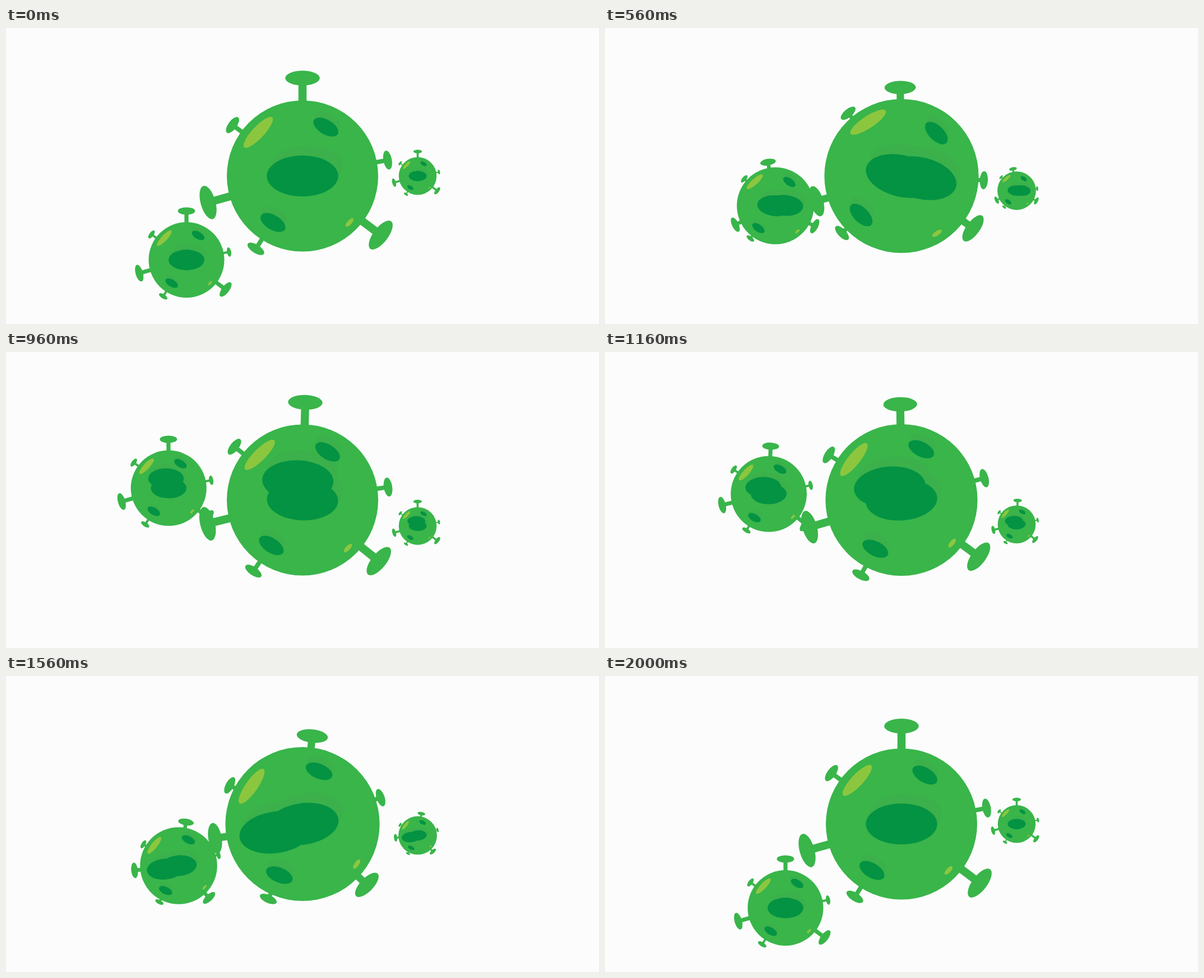
An HTML page with a canvas that plays this animation: 1058x529 px, repeating every 2040 ms.

```html
<!DOCTYPE html>
<html lang="en">
<head>
<meta charset="utf-8">
<title>Floating viruses</title>
<style>
  html, body { margin: 0; width: 100%; height: 100%; overflow: hidden; background: #fcfcfc; }
  canvas { display: block; }
</style>
</head>
<body>
<canvas id="stage" width="1058" height="529"></canvas>
<script>
const ctx = document.getElementById('stage').getContext('2d');
const GREEN = '#39b54a', DARK = '#049343', SHADE = '#3bb04b', LIGHT = '#8cc63f';
const LOOP = 2040, STEP = 40;
const rad = degrees => degrees * Math.PI / 180;

// Cubic bezier easing with flat ends
function ease(x) {
  let low = 0, high = 1, s = 0.5;
  for (let i = 0; i < 24; i++) {
    s = (low + high) / 2;
    const at = 3 * s * (1 - s) ** 2 * 0.33 + 3 * s * s * (1 - s) * 0.716 + s ** 3;
    if (at < x) low = s; else high = s;
  }
  return s * s * (3 - 2 * s);
}

// Eased value of a list of [time, value] keys
function track(t, keys) {
  const next = keys.findIndex(key => key[0] >= t);
  if (next === 0) return keys[0][1];
  const [t0, a] = keys[next - 1], [t1, b] = keys[next];
  return a + (b - a) * ease((t - t0) / (t1 - t0));
}
const quarters = (t, ...values) => track(t, values.map((v, i) => [i * 500, v]));

// Radial spikes: angle clockwise from the top, in degrees
const BIG = { angles: [0, 127.1, 254.3], reach: 175, a: 30.8, b: 13.2, stalk: 14.5 };
const SMALL = { angles: [-53.9, 79.4, 212.6], reach: 154.5, a: 17, b: 7.6, stalk: 8 };
const DARK_SPOTS = [[41.7, -87.5], [-52.7, 83]];
const LIGHT_SPOTS = [[-79, -78, 36.8, 10.6], [84, 83, 9.6, 4]];

function ellipse(x, y, a, b, angle, color) {
  ctx.fillStyle = color;
  ctx.beginPath();
  ctx.ellipse(x, y, a, b, angle, 0, 2 * Math.PI);
  ctx.fill();
}

function spikes({ angles, reach, a, b, stalk }, turn, scale) {
  for (const angle of angles) {
    ctx.save();
    ctx.rotate(rad(angle + turn));
    ctx.scale(scale, scale);
    ctx.fillStyle = GREEN;
    ctx.fillRect(-stalk / 2, -reach, stalk, reach - 60);
    ellipse(0, -reach, a, b, 0, GREEN);
    ctx.restore();
  }
}

function virus(t, x, y, size, tilt) {
  const swing = quarters(t, 0, 1, 0, -1, 0), pulse = Math.abs(swing);
  const grow = 1 + 0.02 * pulse;
  const bodyTurn = 5 * swing;

  ctx.save();
  ctx.translate(x, y);
  ctx.scale(size, size);
  spikes(BIG, tilt - 10 * swing, 1 - 0.1 * pulse);
  spikes(SMALL, tilt + bodyTurn, 1 - 0.05 * pulse);

  ctx.scale(grow, grow);
  ellipse(0, 0, 135, 135, 0, GREEN);

  const turn = rad(tilt + bodyTurn);
  const rotated = (px, py, angle) => [
    px * Math.cos(angle) - py * Math.sin(angle),
    px * Math.sin(angle) + py * Math.cos(angle)
  ];
  const drift = rotated(
    quarters(t, 0, 35.8, -10.5, -50, 0),
    quarters(t, 0, 0, -35, 12.5, 0),
    rad(tilt)
  );
  const mouths = [[0, 0], drift];
  const spots = DARK_SPOTS.map(([px, py]) => rotated(px, py, turn));
  const darkLayer = (color, mx, my, sx, sy) => {
    for (const [px, py] of mouths) ellipse(px + mx, py + my, 63.5, 36.5, turn, color);
    for (const [px, py] of spots) ellipse(px + sx, py + sy, 24.8, 13.1, turn + rad(31), color);
  };
  darkLayer(SHADE, 8, -17.5, 2.5, -11.5);
  darkLayer(DARK, 0, 0, 0, 0);

  for (const [px, py, a, b] of LIGHT_SPOTS) {
    ellipse(...rotated(px, py, turn), a, b, turn - rad(46.9), LIGHT);
  }
  ctx.restore();
}

function draw(now) {
  const t = Math.floor((now % LOOP) / STEP) * STEP;
  const travel = track(t, [[0, 0], [1000, 1], [2000, 0]]);
  const tilt = track(t, [[0, 0], [580, 8.8], [1300, -4.65], [2000, 0]]);

  ctx.fillStyle = '#fcfcfc';
  ctx.fillRect(0, 0, 1058, 529);
  virus(t, 529, 264.5, 1, tilt);
  virus(t, 322 - 32 * travel, 414.5 - 172.3 * travel, 0.5, 0);
  virus(t, 734.5, 264.5 + 46.7 * travel, 0.25, 0);
}

function frame() {
  draw(performance.now());
  requestAnimationFrame(frame);
}
frame();
</script>
</body>
</html>
```
